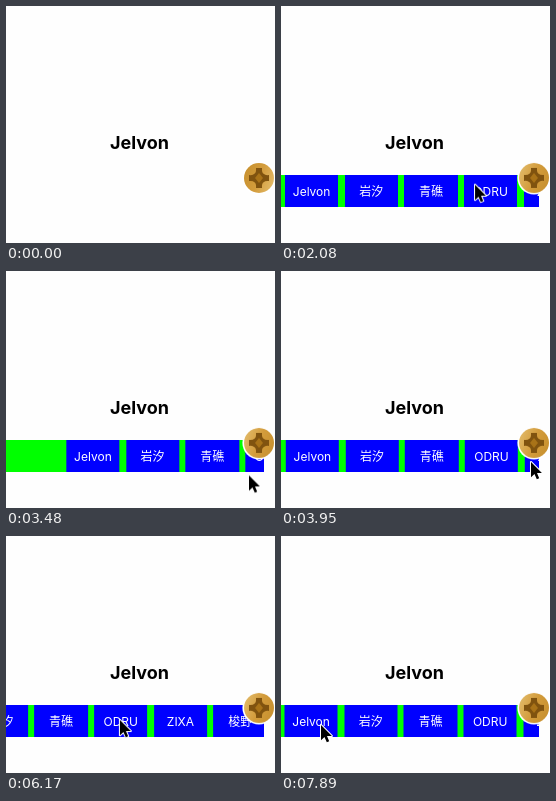
An HTML page for the animation above (8000 ms loop, 269x237 px).

```html
<!DOCTYPE html>
<html lang="zh-CN">
<head>
<meta charset="utf-8">
<title>Sliding menu</title>
<style>
  html, body { margin: 0; width: 100%; height: 100%; overflow: hidden; background: #fefefe; }
  body { position: relative; font-family: Inter, "Noto Sans CJK SC", "Noto Sans CJK", sans-serif; }
  body > * { position: absolute; }

  .title {
    left: 33.5px; top: 125px; width: 200px;
    font-size: 18px; line-height: 24px; font-weight: 700; text-align: center; color: #000;
  }

  /* The bar slides out from under the screw; its items scroll inside it. */
  .bar { left: -2.7px; top: 168.7px; width: 260.5px; height: 32.8px; overflow: hidden; }
  .strip { height: 100%; background: #0f0; animation: open 8s infinite; }
  .items {
    display: flex; gap: 6.5px; padding-left: 6.7px; height: 100%; width: max-content;
    animation: scroll 8s infinite;
  }
  .items span {
    width: 53.2px; background: #00f; color: #fff;
    font-size: 12px; line-height: 33px; text-align: center; white-space: nowrap;
  }

  .screw { left: 236px; top: 155px; width: 34px; height: 34px; animation: turn 8s infinite; }
  .cursor { left: 0; top: 0; width: 14px; height: 20px; overflow: visible; animation: point 8s linear infinite; }

  @keyframes open {
    0% { transform: translateX(262px); }
    14.5% { transform: translateX(262px); animation-timing-function: ease-in-out; }
    21%, 100% { transform: none; }
  }

  @keyframes turn {
    0%, 10.9% { transform: none; filter: none; }
    11%, 13.8% { transform: none; filter: brightness(.85); }
    13.9% { transform: none; filter: none; }
    14.5% { transform: none; filter: none; animation-timing-function: ease-in-out; }
    21%, 100% { transform: rotate(180deg); filter: none; }
  }

  @keyframes scroll {
    0%, 36.9% { transform: none; animation-timing-function: linear; }
    38.25% { transform: translateX(16px); animation-timing-function: cubic-bezier(.3, .5, .6, 1); }
    43.3% { transform: translateX(64px); animation-timing-function: cubic-bezier(.2, .7, .3, 1); }
    49.38% { transform: translateX(.8px); animation-timing-function: ease-out; }
    56%, 74.9% { transform: none; animation-timing-function: linear; }
    77.13% { transform: translateX(-94.8px); animation-timing-function: ease-out; }
    78.63%, 85.5% { transform: translateX(-104.5px); animation-timing-function: cubic-bezier(.35, .2, .4, 1); }
    91.5%, 100% { transform: translateX(-.5px); }
  }

  @keyframes point {
    0%, 3.5% { transform: translate(276px, 175px); }
    6.63%, 8.8% { transform: translate(257px, 174px); }
    11.75%, 22% { transform: translate(254px, 175px); animation-timing-function: ease-in-out; }
    32.38% { transform: translate(61px, 187px); }
    33.13%, 36.5% { transform: translate(60px, 187px); }
    38.25% { transform: translate(107px, 187px); }
    43.13% { transform: translate(240px, 203px); }
    45.3% { transform: translate(257px, 211px); }
    46.5% { transform: translate(256px, 201px); }
    49.38% { transform: translate(250px, 191px); }
    56.63%, 61.6% { transform: translate(234px, 190px); }
    61.88% { transform: translate(217px, 188.5px); }
    65.38%, 67.4% { transform: translate(130px, 190px); animation-timing-function: ease-in-out; }
    72.63%, 74.6% { transform: translate(221px, 188px); }
    77.13% { transform: translate(114px, 184px); animation-timing-function: ease-out; }
    78.63%, 85.2% { transform: translate(104px, 186px); animation-timing-function: ease-in-out; }
    89.8% { transform: translate(215px, 192px); animation-timing-function: ease-in-out; }
    94.88%, 95.4% { transform: translate(104px, 190px); }
    98.63%, 100% { transform: translate(40px, 189px); }
  }
</style>
</head>
<body>
  <div class="title">Jelvon</div>

  <div class="bar">
    <div class="strip">
      <div class="items">
        <span>Jelvon</span><span>岩汐</span><span>青礁</span><span>ODRU</span><span>ZIXA</span><span>梭野</span>
      </div>
    </div>
  </div>

  <svg class="screw" viewBox="-17 -17 34 34">
    <defs>
      <linearGradient id="gold" x1="0" y1=".3" x2="1" y2=".7">
        <stop offset="0" stop-color="#c8912f"/>
        <stop offset=".5" stop-color="#d39c3c"/>
        <stop offset="1" stop-color="#e2b967"/>
      </linearGradient>
    </defs>
    <circle r="16.6" fill="#fff"/>
    <circle r="15" fill="url(#gold)"/>
    <path d="M-3-10H3Q2.5-5 5-4Q6-2.5 10-3V3Q6 2.5 5 4Q2.5 5 3 10H-3Q-2.5 5-5 4Q-6 2.5-10 3V-3Q-6-2.5-5-4Q-2.5-5-3-10Z" fill="#80530f"/>
    <path d="M0-5L4 0L0 5L-4 0Z" fill="#a97318"/>
  </svg>

  <svg class="cursor" viewBox="0 0 14 20">
    <path d="M0 0V15.2L3.5 11.9L5.8 17.2L8.2 16.2L6 11H10.9Z" fill="#000" stroke="#fff" stroke-width="2" stroke-linejoin="round" paint-order="stroke"/>
  </svg>
</body>
</html>
```
